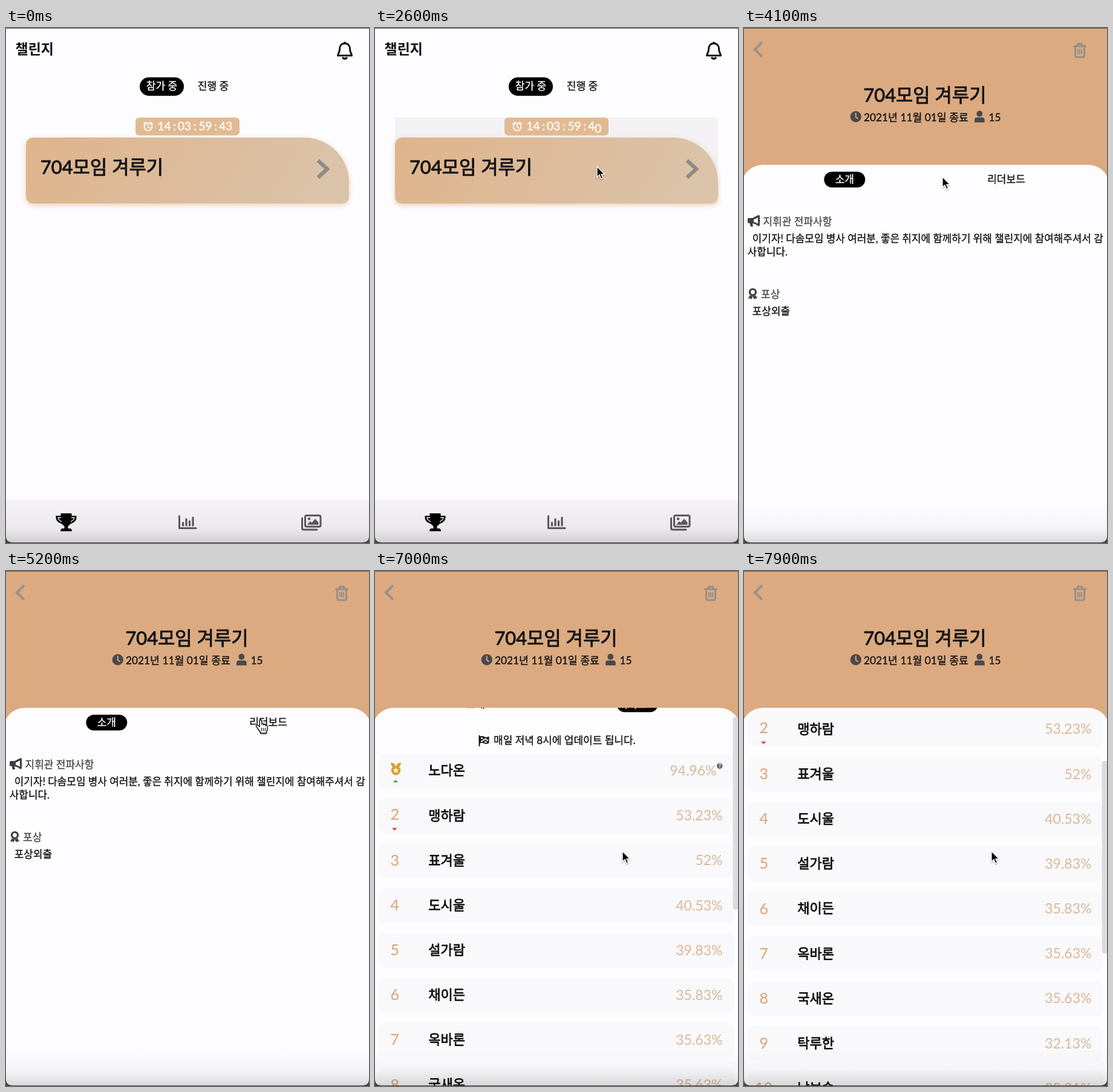
An HTML page for the animation above (8 s loop, 600x851 px).

```html
<!DOCTYPE html>
<html lang="ko">
<head>
<meta charset="utf-8">
<title>챌린지</title>
<style>
html, body { margin: 0; width: 100%; height: 100%; overflow: hidden; background: #fdfcff; }
svg { display: block; width: 600px; height: 851px; }
/* a thin outline in the text colour gives the medium weight */
text {
  --ink: #111; fill: var(--ink); stroke: var(--ink); stroke-width: .3; stroke-linejoin: round; white-space: pre;
  font: 400 17px Lato, "Noto Sans CJK KR", "Noto Sans CJK", sans-serif;
}
.mid { text-anchor: middle; }
.end { text-anchor: end; }
.light { --ink: #fff; }
.big { font-size: 30.8px; stroke-width: .9; }
.clock { --ink: #fffaf5; font-size: 19px; stroke-width: .55; }
.date { font-size: 17.3px; }
.para { font-size: 16.9px; }
.head { --ink: #454347; }
.rank { --ink: #dba97b; font-size: 25px; stroke-width: .15; }
.name { font-size: 22px; stroke-width: .8; }
.rate { --ink: #dabd9f; font-size: 23px; stroke-width: .15; }
.line { fill: none; stroke-linecap: round; stroke-linejoin: round; }
</style>
</head>
<body>
<svg viewBox="0 0 600 851" xmlns="http://www.w3.org/2000/svg">
<defs>
  <linearGradient id="tan" x1="0" y1="0" x2="1" y2=".12">
    <stop offset="0" stop-color="#dfb48b"/><stop offset=".5" stop-color="#ddbb9a"/><stop offset="1" stop-color="#dbc3a9"/>
  </linearGradient>
  <linearGradient id="edge"><stop offset="0" stop-opacity="0"/><stop offset=".6" stop-opacity=".06"/><stop offset="1" stop-opacity=".26"/></linearGradient>
  <linearGradient id="foot" x1="0" y1="0" x2="0" y2="1">
    <stop offset="0" stop-opacity="0"/><stop offset=".6" stop-opacity=".035"/><stop offset="1" stop-opacity=".14"/>
  </linearGradient>
  <filter id="glow" x="-10%" y="-30%" width="120%" height="160%"><feGaussianBlur stdDeviation="4"/></filter>
  <filter id="drop" x="-50%" y="-50%" width="200%" height="200%"><feDropShadow dx="0" dy="1.5" stdDeviation="1.2" flood-opacity=".35"/></filter>
  <clipPath id="item"><rect x="33" y="148" width="534" height="143"/></clipPath>
  <clipPath id="sheet"><path d="M-4 851V261A35 35 0 0 1 31 226H569A35 35 0 0 1 604 261V851Z"/></clipPath>
  <path id="card" d="M45 181H493A74 74 0 0 1 567 255V278A12 12 0 0 1 555 290H45A12 12 0 0 1 33 278V193A12 12 0 0 1 45 181Z"/>
</defs>

<rect width="600" height="851" fill="#fdfcff"/>
<g id="home">
  <text x="15.5" y="42.5" style="font-size:23px;font-weight:700;stroke-width:0">챌린지</text>
  <g class="line" stroke="#111" stroke-width="3">
    <path d="M560 25.5C554 25.5 551.5 30 551.5 35C551.5 41 548.5 42 548.5 45.5H571.5C571.5 42 568.5 41 568.5 35C568.5 30 566 25.5 560 25.5ZM560 25.5V24"/>
    <path d="M557 49.5Q560 52 563 49.5" stroke-width="3.4"/>
  </g>
  <rect x="221" y="81.5" width="73" height="30.5" rx="15.2"/>
  <text class="mid light" x="257.5" y="102.3">참가 중</text>
  <text class="mid" x="342.5" y="102.3">진행 중</text>

  <g id="hover" clip-path="url(#item)">
    <rect x="33" y="148" width="534" height="143" fill="#f3f1f4"/>
    <circle id="ripple" cx="328" cy="247" fill="#e9e7ea"/>
  </g>
  <use href="#card" y="3" fill="#e6c29f" opacity=".75" filter="url(#glow)"/>
  <use href="#card" fill="url(#tan)"/>
  <rect x="214" y="148" width="172" height="29.5" rx="6" fill="#e2ba92"/>
  <g class="line" stroke="#fffaf5" stroke-width="1.9">
    <circle cx="235" cy="163.3" r="6.3"/><path d="M235 159.8V163.6L237.6 165.2M228 158.2L231 155.6M242 158.2L239 155.6"/>
  </g>
  <g id="timer"></g>
  <text class="big" x="57" y="240.5">704모임 겨루기</text>
  <path class="line" d="M518 221L531 233L518 245" stroke="#8d8c8a" stroke-width="6.4" style="stroke-linecap:square;stroke-linejoin:miter"/>

  <rect x="-10" y="778" width="620" height="8" fill="#f3f1f4" opacity=".5"/>
  <rect x="-10" y="781" width="620" height="70" fill="#f3f1f4"/>
  <g>
    <path d="M90.5 802H108.500V806H116.500V809C116.500 815 111 818 106.500 819.500Q104 822.500 102.500 823V827H106Q109 827.500 109 831.500H90Q90 827.500 93 827H96.500V823Q95 822.500 92.500 819.500C88 818 82.500 815 82.500 809V806H90.500Z"/>
    <path class="line" d="M90.500 809H86Q86.500 813 91.500 815.500M108.500 809H113Q112.500 813 107.500 815.500" stroke="#f3f1f4" stroke-width="1.4"/>
  </g>
  <g class="line" stroke="#5b595d" stroke-width="3">
    <path d="M286.500 806.500V826.500H314"/>
    <path d="M292.500 822V817.500M298 822V811.500M303.500 822V815M309 822V809" stroke-width="3.2"/>
  </g>
  <g class="line" stroke="#5b595d" stroke-width="3">
    <rect x="494.500" y="805.500" width="25.500" height="18.500" rx="2.500"/>
    <path d="M489.500 810V826.500Q489.500 829 492 829H514"/>
    <circle cx="501" cy="811" r="1.2" stroke-width="2"/>
    <path d="M499 820L503 815.500L505.500 818L511 811.500L516 817V820Z" fill="#5b595d" stroke-width="1"/>
  </g>
</g>

<g id="detail">
  <rect x="-44" width="40" height="851" fill="url(#edge)"/>
  <rect x="-4" width="608" height="851" fill="#dbaa80"/>
  <path class="line" d="M28.500 25L18 35.500L28.500 46" stroke="#97918b" stroke-width="4" style="stroke-linecap:square;stroke-linejoin:miter"/>
  <g class="line" stroke="#968e87" stroke-width="3">
    <path d="M545.500 30H564.500M547.500 30V46Q547.500 48 549.500 48H560.500Q562.500 48 562.500 46V30M550.500 29L552 26H558L559.500 29"/>
    <path d="M552 35V43.500M555 35V43.500M558 35V43.500" stroke-width="2" stroke-linecap="butt"/>
  </g>
  <text class="big mid" x="299" y="122">704모임 겨루기</text>
  <circle cx="184.800" cy="146.500" r="9.200" fill="#4b494d"/>
  <path class="line" d="M184.800 141V147.200L188 149.500" stroke="#dbaa80" stroke-width="1.900"/>
  <text class="date" x="198" y="154">2021년 11월 01일 종료</text>
  <g fill="#4b494d"><circle cx="389.300" cy="141.700" r="4.900"/><path d="M381 156V152Q381 147.800 385.500 147.800H393Q397.700 147.800 397.700 152V156Z"/></g>
  <text class="date" x="404.500" y="154">15</text>

  <g clip-path="url(#sheet)">
    <rect x="-4" y="226" width="608" height="625" fill="#fdfcff"/>
    <g id="scroll">
      <rect id="pill" y="237.500" width="68" height="26" rx="13"/>
      <text id="tabA" class="mid" x="166.300" y="256.300">소개</text>
      <text id="tabB" class="mid" x="433.500" y="256.300">리더보드</text>
      <g id="intro">
        <g fill="#3f3d41">
          <path d="M24 309L14 314H8Q6 314 6 316V320.500Q6 322.500 8 322.500H9.500L11 328H15L14 322.800Q19 323.500 24 327.500Q26 327.500 26 325.500V320Q27.500 318.300 26 316.500V311Q26 309 24 309ZM23 313V323.500Q19.500 321 16 320.500V316.300Q20 315.500 23 313Z" fill-rule="evenodd"/>
          <circle cx="14.500" cy="436.500" r="5" fill="none" stroke="#3f3d41" stroke-width="3.200"/>
          <path d="M9.500 442L7 447L10.500 446.800L12 448.500L14.500 444L17 448.500L18.500 446.800L22 447L19.500 442L14.500 443.500Z"/>
        </g>
        <text class="head" x="31.500" y="326.300">지휘관 전파사항</text>
        <text class="para" x="13.800" y="354.300">이기자! 다솜모임 병사 여러분, 좋은 취지에 함께하기 위해 챌린지에 참여해주셔서 감</text>
        <text class="para" x="5.800" y="376.300">사합니다.</text>
        <text class="head" x="28" y="446">포상</text>
        <text class="para" x="13.800" y="474.300">포상외출</text>
      </g>
      <g id="board">
        <path class="line" d="M172.500 302.500V319" stroke="#111" stroke-width="2"/>
        <path d="M172.500 304Q177 302 180.500 304Q184 306 188.500 303.500V314.500Q184 317 180 315Q177 313.500 172.500 315Z" fill="#111"/>
        <path d="M175 306.500H178M181 308H184.500M178 309.500H181M184.500 310H187M175 311.500H178M181 313H184.500" stroke="#fdfcff" stroke-width="2.400"/>
        <text x="196" y="316.300">매일 저녁 8시에 업데이트 됩니다.</text>
        <g id="rows"></g>
        <g>
          <path d="M25.300 347.500H31L34 352.500L29.500 355.500ZM43.700 347.500H38L35 352.500L39.500 355.500Z" fill="#d6a235"/>
          <circle cx="34.500" cy="359.800" r="7.800" fill="#d6a235"/>
          <path id="star" fill="#fbf4e4"/>
          <path d="M30 379.500L34 375.300L38 379.500Z" fill="#4a9d4e"/>
          <path d="M28 454.800H36.500L32.300 459.300Z" fill="#e2493a"/>
          <circle cx="569.800" cy="352.300" r="4.800" fill="#68666a"/>
          <text class="mid light" x="569.800" y="355.300" style="font-size:8.500px">?</text>
        </g>
      </g>
    </g>
  </g>
  <rect id="thumb" x="591.500" width="10" height="318" rx="4" fill="#dddbde"/>
</g>

<rect y="790" width="600" height="61" fill="url(#foot)"/>
<rect width="600" height="1" fill="#55565a"/>
<path d="M0 839Q0 850 11 850H589Q600 850 600 839V851H0Z" fill="#444"/>

<g id="cursor" filter="url(#drop)">
  <path id="arrow" d="M0 0V17.300L4 13.600L6.800 20L9.600 18.800L6.900 12.600H12.300Z" fill="#000" stroke="#fff" stroke-width="1.300"/>
  <g id="hand" class="line" stroke="#000" stroke-width="1.300">
    <path d="M-1.800 2Q-1.800 0 0 0Q1.800 0 1.800 2V7.500Q2.300 6.200 3.600 6.400Q5 6.600 5 8.500Q5.600 7.200 7 7.500Q8.200 7.800 8.200 9.500Q9 8.500 10 9Q11 9.500 11 11V14.500Q11 17 9.500 19V22H-.5V20Q-3 17.500-4.500 14.500L-7.300 10.500Q-8 9 -6.800 8.500Q-5.400 8-3.600 9.800L-1.800 11.500Z" fill="#fff"/>
    <path d="M1.300 13.500V18M4.300 13.500V18M7.300 13.500V18" stroke-width="1.100"/>
  </g>
</g>
</svg>
<script>
const $ = id => document.getElementById(id);
const show = (id, on) => $(id).setAttribute('display', on ? 'inline' : 'none');
const shift = (id, x, y) => $(id).setAttribute('transform', `translate(${x} ${y})`);
const smooth = u => u * u * (3 - 2 * u);

// Eased value of a keyframe list [time, value]
function track(t, keys) {
  if (t <= keys[0][0]) return keys[0][1];
  for (let i = 1; i < keys.length; i++) {
    const [a, va] = keys[i - 1], [b, vb] = keys[i];
    if (t < b) return va + (vb - va) * smooth((t - a) / (b - a));
  }
  return keys[keys.length - 1][1];
}

// cubic-bezier(.32, .72, 0, 1)
function slide(u) {
  if (u <= 0) return 0;
  if (u >= 1) return 1;
  const curve = (s, a, b) => 3 * (1 - s) ** 2 * s * a + 3 * (1 - s) * s * s * b + s ** 3;
  let lo = 0, hi = 1;
  for (let i = 0; i < 24; i++) {
    const m = (lo + hi) / 2;
    if (curve(m, .32, 0) < u) lo = m; else hi = m;
  }
  return curve(lo, .72, 1);
}

const people = [
  ['노다온', '94.96'], ['맹하람', '53.23'], ['표겨울', '52'], ['도시울', '40.53'], ['설가람', '39.83'],
  ['채이든', '35.83'], ['옥바론', '35.63'], ['국새온', '35.63'], ['탁루한', '32.13'], ['남보슬', '30.21']
];
$('rows').innerHTML = people.map(([name, rate], i) => {
  const y = 331.3 + i * 74.15;
  const rank = i ? `<text class="rank mid" x="32.800" y="${y + (i === 1 ? 35.7 : 37.5)}">${i + 1}</text>` : '';
  return `<rect x="6" y="${y}" width="588" height="58.300" rx="13" fill="#f9f8fa"/>${rank}
    <text class="name" x="88.300" y="${y + 36.3}">${name}</text>
    <text class="rate end" x="${i ? 574.5 : 564.5}" y="${y + 37}">${rate}%</text>`;
}).join('');

let star = '';
for (let i = 0; i < 10; i++) {
  const r = i % 2 ? 2.3 : 5, a = i * Math.PI / 5;
  star += `${i ? 'L' : 'M'}${34.5 + r * Math.sin(a)} ${359.8 - r * Math.cos(a)}`;
}
$('star').setAttribute('d', star + 'Z');

const clockText = (x, s, id = '') => `<text class="clock" ${id} x="${x}" y="169.300">${s}</text>`;
$('timer').innerHTML = [[250.5, '14'], [284, '03'], [318.5, '59']].map(p => clockText(...p)).join('') +
  [276.3, 310.3, 344.3].map(x => clockText(x, ':')).join('') +
  '<g id="tens"></g>' + clockText(363.3, '', 'id="ones"');
$('tens').innerHTML = clockText(352.3, '4');

// The last digit leaves upwards, the next one rises from below
function drawTimer(t) {
  const now = t < 3400 ? t : 3530;
  const n = Math.floor((now - 450) / 1000);
  const u = Math.min(1, (now - 450 - n * 1000) / 350);
  const leaving = n >= 0 && u < .35;
  const left = 43 - (n + 1) + (leaving ? 1 : 0);
  const y = n < 0 ? 0 : leaving ? -5 * u / .35 : 4.3 * (1 - (u - .35) / .65);
  $('tens').firstChild.textContent = Math.floor(left / 10);
  $('ones').textContent = left % 10;
  $('ones').setAttribute('opacity', leaving ? 1 - u / .5 : 1);
  shift('ones', 0, y);
}

const cursorX = [[1450, 545], [2100, 367], [2600, 367], [2900, 328], [4400, 328], [5200, 421], [6050, 421], [6400, 409]];
const cursorY = [[1450, 172], [2100, 225], [2400, 225], [2600, 229], [2900, 246], [6050, 246], [6400, 463]];
const scrollY = [[6800, 0], [7200, 60], [7400, 60], [7500, 62.5], [7900, 173]];

function draw(t) {
  const p = t < 3550 ? 0 : slide((t - 3413) / 540);
  shift('home', -203 * p, 0);
  shift('detail', 608 * (1 - p), 0);
  show('home', p < 1);
  show('detail', p > 0);
  drawTimer(t);
  show('hover', t >= 1500);
  $('ripple').setAttribute('r', t < 3550 ? 0 : 160 + (t - 3600) * .3);

  const board = t >= 5300;
  $('pill').setAttribute('x', board ? 399.7 : 132.3);
  $('tabA').classList.toggle('light', !board);
  $('tabB').classList.toggle('light', board);
  show('intro', !board);
  show('board', t >= 5600);

  const s = track(t, scrollY);
  shift('scroll', 0, -s);
  show('thumb', t > 6850);
  $('thumb').setAttribute('y', 226.3 + .507 * s);

  const hand = t >= 4900 && t < 6150;
  show('cursor', t >= 1500);
  show('arrow', !hand);
  show('hand', hand);
  shift('cursor', track(t, cursorX), track(t, cursorY));
}

const start = performance.now();
function tick() {
  draw((performance.now() - start) % 8000);
  requestAnimationFrame(tick);
}
draw(0);
requestAnimationFrame(tick);
</script>
</body>
</html>
```
